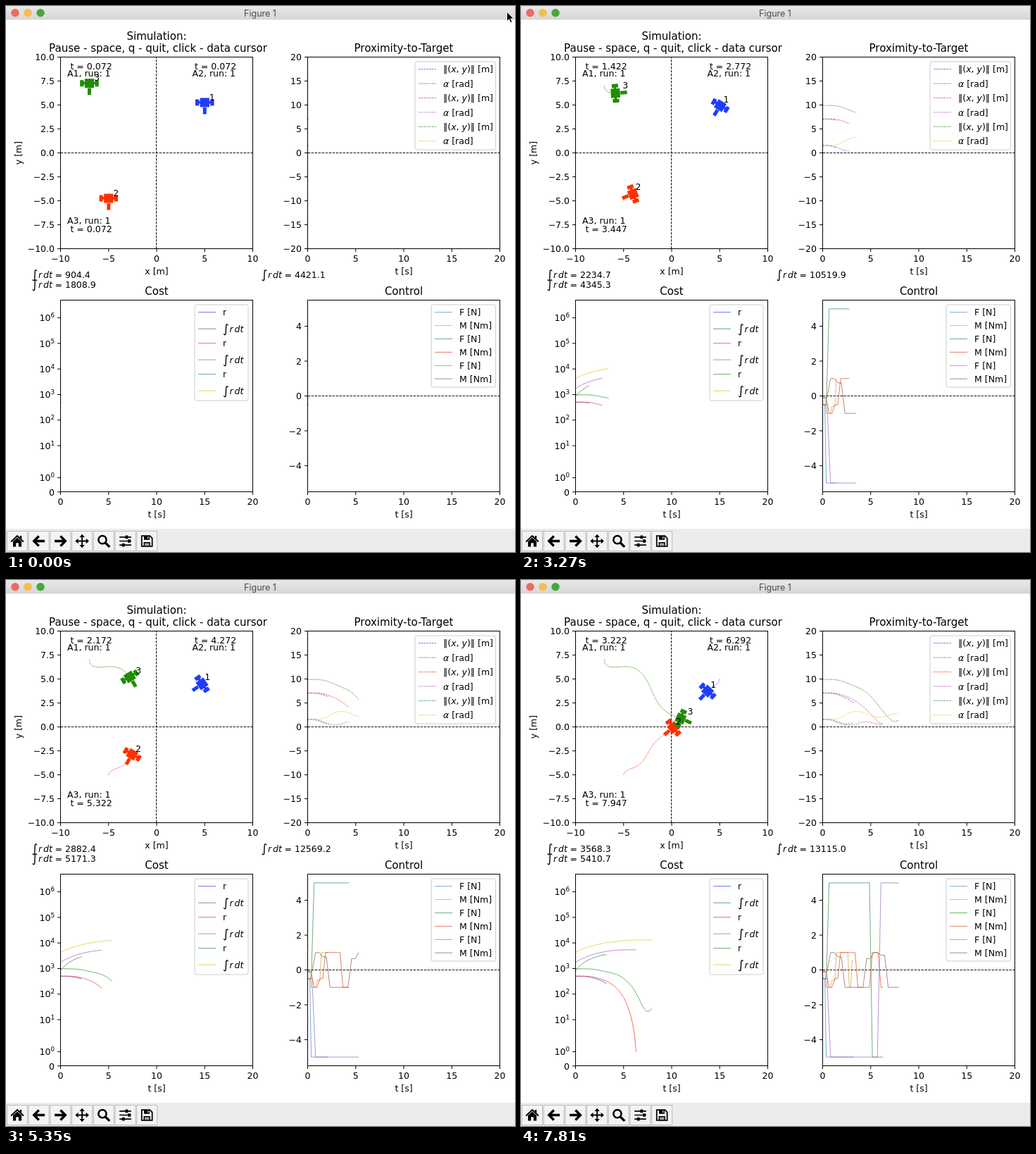
Write an HTML page that moves like this. It is 723 px wide and 775 px high and loops after 8000 ms.

```html
<!DOCTYPE html>
<html lang="en">
<head>
<meta charset="utf-8">
<title>Figure 1</title>
<style>
html, body { margin: 0; width: 100%; height: 100%; overflow: hidden; background: #fff; }
svg { display: block; width: 100%; height: 100%; }
text { font: 12.5px "DejaVu Sans", sans-serif; white-space: pre; }
.title { font-size: 15px; }
.bar { font: 12.5px Inter, sans-serif; fill: #4b4b4b; }
.m { text-anchor: middle; }
.e { text-anchor: end; }
.i { font-style: italic; }
.int { font-size: 17px; }
.sup { font-size: 8.75px; }
.line { fill: none; stroke-width: .7; }
.dash { stroke-dasharray: 2.6 1.1; }
.zero { stroke-width: .95; stroke-dasharray: 3.5 1.5; }
.axis { fill: none; stroke: #000; }
.icon { fill: none; stroke: #000; }
.icon .f { fill: #000; stroke: none; }
</style>
</head>
<body>
<svg viewBox="0 0 723 775">
  <defs>
    <linearGradient id="bar" x2="0" y2="1">
      <stop stop-color="#e9e9e9"/><stop offset="1" stop-color="#d5d5d5"/>
    </linearGradient>
  </defs>
  <g id="back"></g>
  <g id="live"></g>
  <g id="front"></g>
  <path id="cursor" d="M0 0V13L3 10.2 5.2 15.2 7.4 14.2 5.2 9.4H9.4Z" stroke="#fff" stroke-width=".8"/>
</svg>
<script>
const $ = id => document.getElementById(id);

// dt: simulated seconds per step; force and moment: {step: value held from there on}
const robots = [
  {
    color: '#1f3cff', start: [5, 5], sum: 832, dt: .15, end: 99,
    force: { 0: -.5, 2: -5 },
    moment: { 0: -.1, 2: -1, 6: -.6, 9: 1, 18: -1, 20: .55 },
    lines: ['#1f3cff', '#1f8a3a', '#1f3cff', '#1f801f', '#3f86c4', '#cfa030']
  },
  {
    color: '#fd3200', start: [-5, -5], sum: 1736.5, dt: .3, end: 6.292,
    force: { 0: -.5, 2: 5, 17: -5 },
    moment: { 0: -.1, 2: -1, 4: -.5, 6: 1, 12: -1, 17: 1, 20: -1 },
    lines: ['#f0300f', '#9a50c8', '#f0300f', '#a050cc', '#2f8f45', '#d9482b']
  },
  {
    color: '#218c00', start: [-7, 7], sum: 4279.6, dt: .375, end: 99,
    force: { 0: -.5, 2: -5, 16: 5 },
    moment: { 0: -.1, 2: 1, 4: .75, 6: -1, 12: .65, 14: 1, 16: .85, 18: -1 },
    lines: ['#1f801f', '#d6c41e', '#1f901f', '#d6c41e', '#9467bd', '#8c564b']
  }
];

const T0 = .072, DT = .003, MASS = 10;
const clockAt = (r, step) => Math.min(T0 + r.dt * step, r.end);
const held = (plan, step) => plan[Math.max(...Object.keys(plan).filter(s => s <= step))];

// A cart pushed by a force along its heading and turned by a moment
function simulate(r) {
  let [x, y] = r.start, angle = Math.PI / 2, speed = 0, spin = 0, sum = r.sum;
  r.track = [];
  for (let t = 0; t < 8.1; t += DT) {
    const dist = Math.hypot(x, y), cost = 10 * dist ** 2 + angle ** 2;
    r.track.push({ t, x, y, angle, dist, cost, sum });
    const step = Math.max(0, Math.floor((t - T0) / r.dt + 1e-6));
    speed += held(r.force, step) / MASS * DT;
    spin += held(r.moment, step) * DT;
    angle += spin * DT;
    x += speed * Math.cos(angle) * DT;
    y += speed * Math.sin(angle) * DT;
    sum += 2 * cost * DT;
  }
}
robots.forEach(simulate);

// Axes
const W = 273, H = 272, LEFT = 77.5, RIGHT = 428.5, TOP = 72.5, LOW = 417.5;
const mapX = x => LEFT + (x + 10) / 20 * W;
const mapY = y => TOP + (10 - y) / 20 * H;
const time = left => t => left + t / 20 * W;
const timeL = time(LEFT), timeR = time(RIGHT);
const proxY = v => TOP + (20 - v) / 40 * H;
const ctrlY = v => LOW + (5.5 - v) / 11 * H;
const logY = v => 689.8 - 36.3 * (v < 2 ? v / 1.8 : 1 / .9 + Math.log10(v / 2));

const text = (x, y, s, cls = '') => `<text x="${x}" y="${y}" class="${cls}">${s}</text>`;
const path = (d, color, cls = '') => `<path d="${d}" class="line ${cls}" stroke="${color}"/>`;
const poly = pts => 'M' + pts.map(p => p.map(n => n.toFixed(2)).join(' ')).join('L');
const minus = s => String(s).replace('-', '−');
const range = (a, b, step) => Array.from({ length: Math.round((b - a) / step) + 1 }, (_, i) => a + i * step);
const integral = (x, y, value = '') =>
  text(x, y + 1, '∫', 'int') + text(x + 9.5, y, 'r', 'i') + text(x + 16.5, y, 'dt', 'i')
  + (value && text(x + 33, y, '= ' + value));

function axes(left, top, xs, xMap, ys, yMap, label = minus) {
  let s = `<rect class="axis" x="${left}" y="${top}" width="${W}" height="${H}"/>`;
  for (const x of xs)
    s += `<path class="axis" d="M${xMap(x)} ${top + H}v4.5"/>` + text(xMap(x), top + H + 18.8, minus(x), 'm');
  for (const y of ys)
    s += `<path class="axis" d="M${left} ${yMap(y)}h-4.5"/>` + text(left - 8.5, yMap(y) + 4.7, label(y), 'e');
  return s;
}

// Rows come in pairs; odd and even gaps may differ
function legend(x, y, w, h, gaps, key, dash, names) {
  const colors = robots.flatMap(r => r.lines.slice(key, key + 2));
  return `<rect x="${x}" y="${y}" width="${w}" height="${h}" rx="2.5" fill="#fff" fill-opacity=".8" stroke="#ccc"/>`
    + colors.map((c, i) => {
      const row = y + 10.7 + (i >> 1) * (gaps[0] + gaps[1]) + i % 2 * gaps[0];
      return path(`M${x + 5} ${row}h25`, c, dash) + names[i % 2](x + 40, row + 4.6);
    }).join('');
}

const plain = s => (x, y) => text(x, y, s);
const logLabel = v => v ? `10<tspan class="sup" dy="-5">${Math.log10(v)}</tspan>` : '0';

const icons = [
  '<path d="M-9.5 1L0-8 9.5 1" stroke-width="2.2"/><path class="f" d="M-6.5.5L0-5.5 6.5.5V8.5H2V3H-2V8.5H-6.5ZM4-8H6.6V-2L4-4.5Z"/>',
  '<path d="M9 0H-6M0-7.5L-7.5 0 0 7.5" stroke-width="3.6"/>',
  '<path d="M-9 0H6M0-7.5L7.5 0 0 7.5" stroke-width="3.6"/>',
  '<path d="M-8 0H8M0-8V8" stroke-width="2"/><path class="f" d="M0-10.5L4-6H-4ZM0 10.5L4 6H-4ZM-10.5 0L-6-4V4ZM10.5 0L6-4V4Z"/>',
  '<circle cx="-2" cy="-2" r="6" stroke-width="2.7"/><path d="M2.5 2.5L9 9" stroke-width="3.6"/>',
  '<path d="M-9-6H9M-9 0H9M-9 6H9" stroke-width="1.8"/><path class="f" d="M0-8.5h4v5h-4zM4-2.5h4v5h-4zM-5 3.5h4v5h-4z"/>',
  '<path d="M-8-8H4.5L8-4.5V8H-8Z" stroke-width="1.9"/><path class="f" d="M-4.5-8H4V-2H-4.5ZM-5 1.5H5V8H-5Z"/><path d="M1.8-7v3.5M-3.5 4h7M-3.5 6h7" stroke="#fff" stroke-width="1.2"/>'
];

$('back').innerHTML =
  '<rect width="723" height="19.5" fill="url(#bar)"/>'
  + ['#ed6a5e', '#f4bd4f', '#45a83c'].map((c, i) => `<circle cx="${13 + 18 * i}" cy="9.8" r="5.7" fill="${c}"/>`).join('')
  + text(361, 14.5, 'Figure 1', 'bar m')
  + '<rect y="742" width="723" height="33" fill="#ececec"/>'
  + icons.map((d, i) => `<rect x="${1.5 + 30.7 * i}" y="745.5" width="29" height="28" fill="#f3f3f3" stroke="#bdbdbd"/>`
    + `<g class="icon" transform="translate(${16 + 30.7 * i} 759.5) scale(.93)">${d}</g>`).join('')
  + text(214, 48, 'Simulation:', 'title m')
  + text(216, 65, 'Pause - space, q - quit, click - data cursor', 'title m')
  + text(565, 65, 'Proximity-to-Target', 'title m')
  + text(214, 410, 'Cost', 'title m') + text(565, 410, 'Control', 'title m')
  + text(214, 381, 'x [m]', 'm') + text(565, 381, 't [s]', 'm')
  + text(214, 726, 't [s]', 'm') + text(565, 726, 't [s]', 'm')
  + '<text class="m" transform="translate(22 208.5) rotate(-90)">y [m]</text>'
  + [`M${LEFT} 208.5h${W}`, `M213.5 ${TOP + H}v${-H}`, `M${RIGHT} 208.5h${W}`, `M${RIGHT} 553.5h${W}`]
    .map(d => path(d, '#000', 'zero')).join('');

const ticks = range(0, 20, 5);
$('front').innerHTML =
  axes(LEFT, TOP, range(-10, 10, 5), mapX, range(-10, 10, 2.5), mapY, v => minus(v.toFixed(1)))
  + axes(RIGHT, TOP, ticks, timeR, range(-20, 20, 5), proxY)
  + axes(LEFT, LOW, ticks, timeL, [0, ...range(0, 6, 1).map(n => 10 ** n)], logY, logLabel)
  + axes(RIGHT, LOW, ticks, timeR, range(-4, 4, 2), ctrlY)
  + legend(581, 79, 114.5, 125, [20.4, 20.4], 0, 'dash',
    [plain('‖(<tspan class="i">x</tspan>, <tspan class="i">y</tspan>)‖ [m]'), plain('<tspan class="i">α</tspan> [rad]')])
  + legend(268, 424, 76, 136, [23.5, 20.5], 2, '', [plain('r'), integral])
  + legend(604, 424, 91.5, 117, [18.9, 18.9], 4, '', [plain('F [N]'), plain('M [Nm]')]);

const curve = (past, x, y, color, dash) =>
  path(poly(past.filter((_, i) => i % 20 === 0 || i === past.length - 1).map(p => [x(p), y(p)])), color, dash);

function signal(r, plan, step, color) {
  const pts = range(0, step, 1).map(k => [timeR(clockAt(r, k)), ctrlY(held(plan, k))]);
  return path(poly([[RIGHT, ctrlY(plan[0])], ...pts]), color);
}

const cart = (r, p) => `<path fill="${r.color}"
  transform="translate(${mapX(p.x)} ${mapY(p.y)}) rotate(${-p.angle * 180 / Math.PI})"
  d="M-3-6.6H10V6.6H-3ZM2-12H5.5V12H2ZM-1-13.3H8V-8H-1ZM-1 8H8V13.3H-1ZM-13-2.5H-3.5V2.5H-13Z"/>`;

function draw(step) {
  const past = robots.map(r => r.track.slice(0, Math.round(clockAt(r, step) / DT) + 1));
  const now = past.map(p => p[p.length - 1]);
  const each = f => robots.map((r, i) => f(r, now[i], past[i], i)).join('');
  const clock = i => 't = ' + clockAt(robots[i], step).toFixed(3);
  const sum = i => now[i].sum.toFixed(1);
  const onT = p => timeR(p.t), onCost = p => timeL(p.t);
  $('live').innerHTML =
    each((r, p, path) => curve(path, q => mapX(q.x), q => mapY(q.y), r.color, 'dash'))
    + each(cart)
    + each((r, p, _, i) => text(mapX(p.x) + 10.5, mapY(p.y) - 7, i + 1, 'm'))
    + text(91.5, 89.5, clock(0)) + text(87, 100, 'A1, run: 1')
    + text(268, 89.5, clock(1)) + text(264.5, 100, 'A2, run: 1')
    + text(87, 309, 'A3, run: 1') + text(91.5, 321, clock(2))
    + integral(36.5, 385.5, sum(0)) + integral(36.5, 400, sum(1)) + integral(362.5, 385.5, sum(2))
    + each((r, p, track) => curve(track, onT, q => proxY(q.dist), r.lines[0], 'dash')
      + curve(track, onT, q => proxY(q.angle), r.lines[1], 'dash')
      + curve(track, onCost, q => logY(q.cost), r.lines[2])
      + curve(track, onCost, q => logY(q.sum), r.lines[3])
      + signal(r, r.force, step, r.lines[4]) + signal(r, r.moment, step, r.lines[5]));
}

// Moments at which the simulation advances; two steps land together at 7460
const beats = [350, 890, 1190, 1890, 2120, 2460, 2730, 2960, 3270, 3620, 3850, 4310, 4730, 5350, 5770, 6230, 6650, 7040, 7460, 7460, 7810];
let shown = -1, start;

function frame(now) {
  start ??= now;
  const t = (now - start) % 8000;
  const step = beats.filter(b => b <= t).length;
  if (step !== shown) draw(shown = step);
  $('cursor').setAttribute('transform', t < 150 ? 'translate(711.5 8.5)' : 'translate(717 11)');
  $('cursor').style.display = t < 250 ? '' : 'none';
  requestAnimationFrame(frame);
}
requestAnimationFrame(frame);
</script>
</body>
</html>
```
